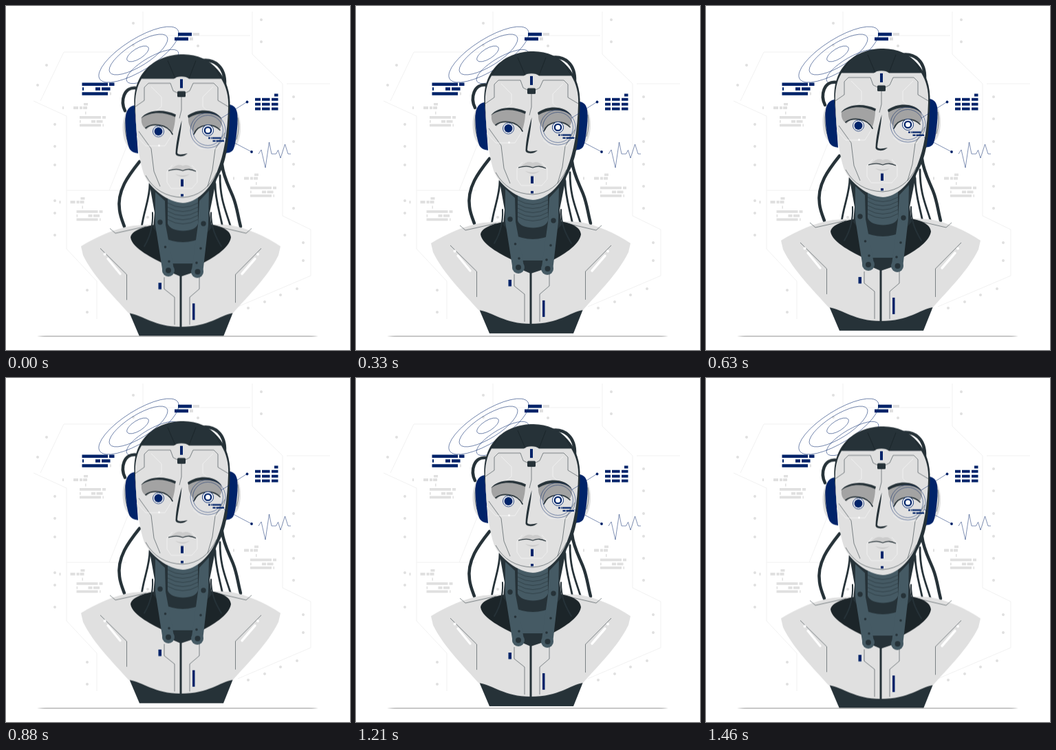
An HTML page for the animation above (1500 ms loop, 500x500 px).

```html
<!DOCTYPE html>
<html lang="en">
<head>
<meta charset="utf-8">
<title>Android bust</title>
<style>
  html, body { margin: 0; width: 100%; height: 100%; overflow: hidden; background: #fff; }
  svg { display: block; width: 100%; height: 100%; }
  .robot { animation: float 1.5s -25ms linear infinite; }
  @keyframes float {
    0%, 100% { transform: translateY(.6px); }
    50% { transform: translateY(-9.4px); }
  }
  .dark { fill: #263238; }
  .slate { fill: #455a64; }
  .skin { fill: #e0e0e0; }
  .navy { fill: #002369; }
  .lid { fill: #a3a3a3; }
  .line { fill: none; stroke: #263238; stroke-width: .55; }
  .lash { fill: none; stroke: #263238; stroke-width: 1.7; stroke-linecap: round; }
  .thin { fill: none; stroke: #002369; stroke-width: .5; }
  .white { fill: none; stroke: #f7f7f7; stroke-width: .7; }
  .cable { fill: none; stroke: #263238; stroke-width: 4.5; stroke-linecap: round; }
  .fine { stroke-width: 2.8; }
  .grid { fill: none; stroke: #ebebeb; stroke-width: .7; }
</style>
</head>
<body>
<svg viewBox="0 0 500 500" xmlns="http://www.w3.org/2000/svg">
  <defs>
    <path id="code" d="M0 5h2v4h-2z M16 5h7v4h-7z M25 5h4v4h-4z M30 5h6v4h-6z M31 0h6v3.500h-6z M33 12.500h1.500v4h-1.500z
      M25 19h31v3.700h-31z M58 19h5v3.700h-5z M25 25h1.700v3.700h-1.700z M42 25h6v3.700h-6z M49.500 25h9v3.700h-9z M25 30.500h31v3.700h-31z M58.500 30.500h1.500v3.700h-1.500z"/>
    <path id="row" d="M0 0h8v4h-8z M10 0h11.500v4h-11.500z M24 0h9.500v4h-9.500z"/>
  </defs>

  <g class="grid">
    <path d="M180 67H84L50 138M40 138L88 160V353L132 400V455M88 268H175M150 268L177 200"/>
    <path d="M199 8V43H355M358 8V70L402 113V305L443 325V392L337 437M408 113H471"/>
  </g>
  <g id="dots" fill="#e0e0e0"></g>
  <g fill="#e0e0e0">
    <use href="#code" x="82" y="141"/>
    <use href="#code" x="77.500" y="278"/>
    <use href="#code" x="330" y="243.500"/>
    <path d="M272 39h9v4h-9z M267 45.500h5v4.500h-5z M151 125.500h2v4h-2z"/>
  </g>

  <g class="thin">
    <ellipse rx="67" ry="23" transform="translate(193 70.500) rotate(-32)"/>
    <ellipse rx="49" ry="16.500" transform="translate(192.500 70.500) rotate(-32)"/>
    <ellipse rx="18" ry="7.500" transform="translate(191.500 69.500) rotate(-32)"/>
    <ellipse rx="43" ry="14" transform="translate(213 88) rotate(-30)"/>
  </g>
  <path class="navy" d="M110.500 111.500h37.500v4.500h-37.500z M150 111.500h7.500v4.500h-7.500z M111 118.300h2v4.400h-2z M130 118.300h7v4.400h-7z M139 118.300h12.500v4.400h-12.500z M110.500 125.200h37.500v4.500h-37.500z
    M250 38.700h20v4.700h-20z M245 45.500h20v4.700h-20z"/>

  <g class="robot">
    <g class="cable">
      <path d="M194 226C178 246 161 268 165 296C166 305 169 312 172 320"/>
      <path d="M314 230C316 248 324 262 330 277C336 292 337 305 341 320"/>
      <path class="fine" d="M209 258C209 280 200 298 197 322M304 258C304 282 311 300 315 322M311 246C311 282 320 298 327 322"/>
      <path d="M190 119C171 116 166 138 173 152M284 79C303 76 319 88 318 114"/>
    </g>

    <path class="dark" d="M177 440L194 480H316L332 440Z"/>
    <path class="skin" d="M109 349C132 335 158 323 185 319L230 316H285L325 318C350 322 378 335 399 349L396 362C381 393 352 421 330 446C310 449 296 466 254 466C215 466 200 449 178 446C156 421 127 393 112 362Z"/>
    <path fill="#1c2529" d="M181 336C183 324 208 318 230 316H288C310 318 326 324 327 336C324 353 300 366 282 376L266 387Q254 394 242 387L232 376C214 366 184 353 181 336Z"/>
    <path class="dark" d="M207 250H306L296 300L299 322L278 345H232L214 322L216 300Z"/>
    <path class="cable" style="stroke-width:2" d="M213 300C214 322 209 336 201 349M298 300C298 322 305 336 313 349"/>
    <path class="slate" d="M235 275H279V316C276 330 239 330 235 316Z"/>
    <path class="line" d="M235 286Q257 299 279 286M235 292Q257 305 279 292M235 298Q257 311 279 298M235 304Q257 317 279 304M235 310Q257 323 279 310"/>
    <path class="slate" d="M226 335Q257 351 288 335L278 374H238Z"/>
    <path class="dark" d="M238 374H276L272 387L254 393L240 387Z"/>
    <path class="slate" d="M217 270L231 283L232 318L244 382L228 388L217 318Z"/>
    <path class="slate" d="M295 268L281 283L279 318L270 383L286 388L294 318Z"/>
    <g class="slate">
      <circle cx="224" cy="314" r="6.500"/><circle cx="287" cy="316" r="6.500"/>
      <circle cx="236" cy="384" r="9"/><circle cx="278" cy="386" r="9"/>
    </g>
    <g class="dark">
      <circle cx="224" cy="314" r="3.700"/><circle cx="287" cy="316" r="3.700"/>
      <circle cx="236" cy="384" r="4"/><circle cx="278.500" cy="386" r="4"/>
      <circle cx="231.500" cy="350" r="1.800"/><circle cx="283" cy="352" r="1.800"/>
      <circle cx="237" cy="371" r="1.800"/><circle cx="277" cy="373" r="1.800"/>
    </g>

    <path fill="none" stroke="#263238" stroke-width="3" d="M254 388V467"/>
    <path class="line" d="M151 323L159 330L204 320M357 323L349 330L306 320M137 352L175.500 390V427M371 352L333.500 390V431
      M230 394V411L245 423V463M281 394V411L267 423V463"/>
    <path d="M148 367L166 389M362 367L343 389" stroke="#fff" stroke-width="3.500" stroke-linecap="round"/>
    <circle cx="143.500" cy="360.500" r="2" fill="#fff"/><circle cx="366" cy="360.500" r="2" fill="#fff"/>
    <path class="navy" d="M221.500 402h4.500v9.500h-4.500z M271 432h3.500v24h-3.500z"/>

    <ellipse class="skin" cx="181" cy="177" rx="11.500" ry="28"/>
    <ellipse class="skin" cx="330" cy="177" rx="11" ry="28"/>
    <path class="line" d="M174 162Q171 178 176 194M337 162Q340 178 335 194"/>
    <path class="navy" d="M187 144C176 146 173 155 173.500 170C174 188 177 203 180 208C183 212 187 213 192 214ZM325 143C337 145 337 157 336.500 171C335 190 333 204 330 209C327 213 323 213 318 214Z"/>

    <path class="dark" d="M187 148C182 102 212 70 258 70C298 70 328 103 325.500 148C325 190 321 220 313 238L304 256H280L190 180Z"/>
    <path class="skin" d="M188 148C187 131 190 117 197 105.500H244C248 101 262 101 266 105.500H313C320 117 324 131 323 148C322 184 317 215 307 240C298 266 276 286 257 286C235 285 210 265 201 246C193 223 189 186 188 148Z"/>
    <path fill="none" stroke="#172126" stroke-width=".7" d="M235 79L246 105M276 79L266 105M208 88L197 105M304 90L313 105"/>
    <path class="line" d="M188 146L201 137V118L207 112H239L243 123L249 126M323 146L308 137V118L302 112H272L267 123L261 126M255 132V151L252 163
      M193 182L211 207L215 240L224 262M318 184L304 208L300 238L293 262M203 246Q220 277 257 278Q290 276 306 242"/>
    <path class="white" d="M211 117L226 132V146L218 152M301 117L286 132V146L293 152M190 189L203 203H231L241 187M272 199L282 207H307L319 193
      M242 231L234 240V256L240 265H270L278 256V240L270 231"/>
    <path class="navy" d="M253 106h4v13h-4z"/>
    <rect class="dark" x="249" y="123.500" width="12" height="8.500" rx="1.500"/>

    <path class="lid" d="M197 162C207 152 229 152 246 160C246 167 245 174 242 184C234 170 213 168 204 179C199 175 196 171 197 162Z"/>
    <path class="lid" d="M265 162C277 151 302 151 313 163C315 171 313 176 309 180C301 169 282 169 275 185C269 180 264 171 265 162Z"/>
    <path class="dark" d="M196 163C206 150 229 149 247 157.500L246 161C229 153 210 153 196 163ZM264 159C280 148 304 149 314 164C301 153 281 153 265 162.500Z"/>
    <path class="lash" d="M203 177C212 170 234 170 242 186M273 186C279 171 300 169 311 180"/>
    <circle cx="221.500" cy="182" r="8" fill="#f5f5f5" stroke="#002369" stroke-width=".8"/>
    <circle class="navy" cx="221.500" cy="182" r="6"/>
    <circle cx="293.500" cy="180.500" r="8" fill="#fff" stroke="#002369"/>
    <circle cx="293.500" cy="180.500" r="4.700" fill="#fff" stroke="#002369" stroke-width="2.300"/>

    <path class="dark" d="M255.500 166C254 186 250 202 249 213C249 216 255 216 264 214C258 220 246.500 219 246.500 214C247 199 251 181 255.500 166Z"/>
    <path fill="#cbcbcb" d="M240 237C248 230 252 230 257 232C262 230 267 231 272 237C266 236 263 236 257 238C250 236 246 236 240 237ZM246 244Q257 248 267 244Q257 252 246 244Z"/>
    <path class="line" style="stroke-width:1.300" d="M236 239C246 236 251 237 257 239C264 236 269 237 276 240"/>
    <path class="navy" d="M254 251.500h4v10.500h-4z M254 273h4v3.500h-4z"/>
    <circle cx="222.500" cy="202.500" r="1.500" fill="#fff"/>

    <g class="thin">
      <circle cx="293.500" cy="180.500" r="25.500"/><circle cx="293.500" cy="180.500" r="22"/>
    </g>
    <path class="navy" d="M294 190.500h3v2.300h-3z M298 190.500h1.500v2.300h-1.500z M300 190.500h12.500v2.300h-12.500z M300.500 194.800h4v2.200h-4z M305.500 194.800h11.500v2.200h-11.500z"/>
  </g>

  <path class="thin" d="M313 163L350 139.500M317 191L357 212M367 215L371 209L377 235L382.500 198L386 215H392.500L395.500 209.500L399 221L405.500 201L410 215H414"/>
  <g class="navy">
    <circle cx="350.500" cy="139.500" r="1.900"/><circle cx="357" cy="212" r="1.900"/>
    <path d="M390 127.500h5.500v4h-5.500z"/>
    <use href="#row" x="362" y="133.700"/>
    <use href="#row" x="362" y="140.700"/>
    <use href="#row" x="362" y="147.400"/>
  </g>
  <path d="M45 480Q50 479.200 60 479.200H440Q449 479.200 454 480Q449 480.800 440 480.800H60Q50 480.800 45 480Z" fill="#b5b5b5"/>
</svg>
<script>
  const columns = [
    [71, [172, 204, 231, 283, 301, 333]],
    [418, [132, 164, 197, 230, 262, 294]],
    [185, [25, 57]], [371, [20, 52]], [432, [344, 370]], [118, [413, 445]],
    [59, [86]], [46, [115]], [279, [58]], [206, [307]],
    [352, [439]], [376, [430]], [399, [420]], [423, [411]]
  ];
  document.getElementById('dots').innerHTML = columns
    .flatMap(([x, ys]) => ys.map(y => `<circle cx="${x}" cy="${y}" r="2"/>`))
    .join('');
</script>
</body>
</html>
```
